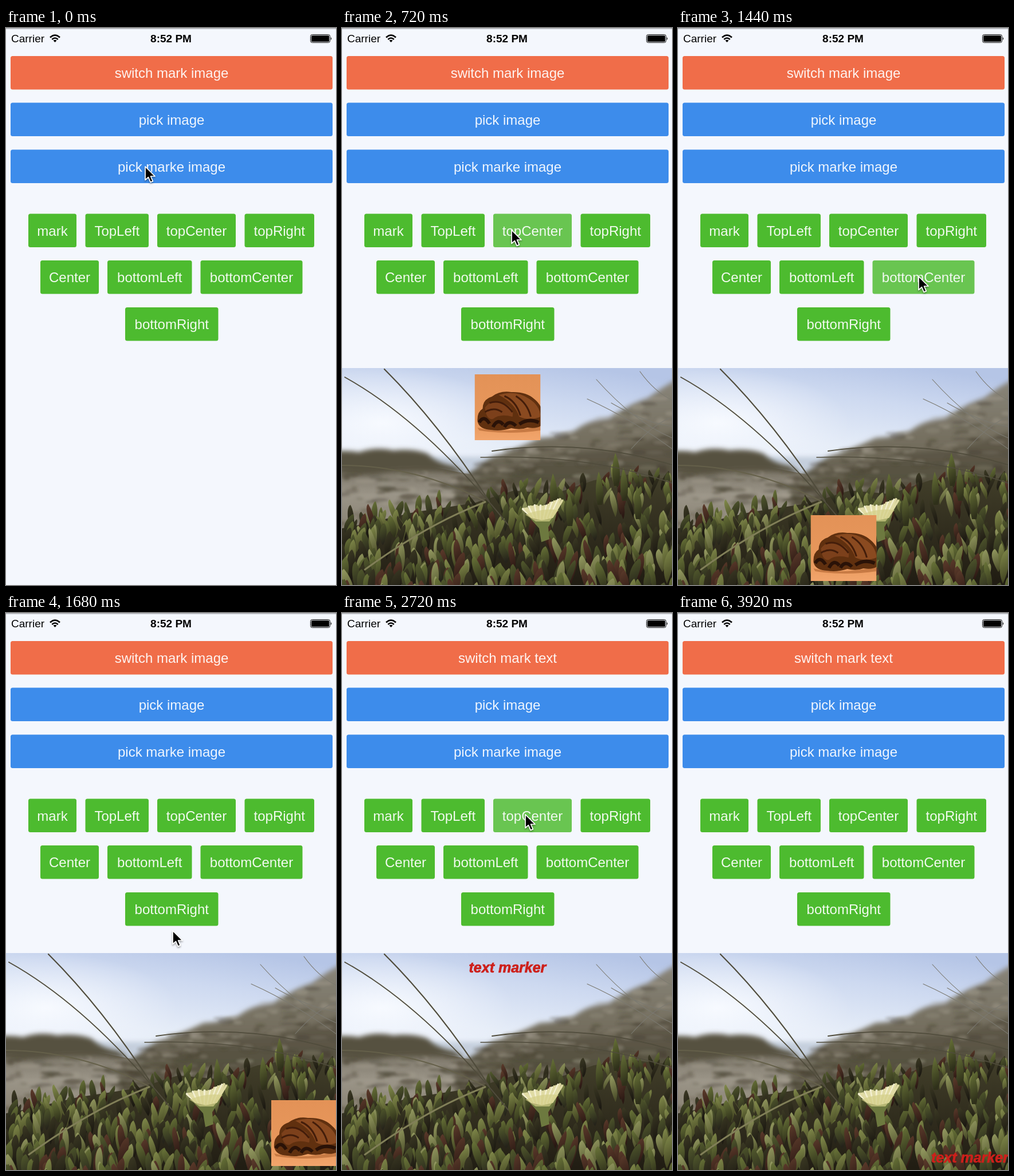
Write an HTML page that moves like this. It is 576 by 973 pixels and loops after 4000 ms.

```html
<!DOCTYPE html>
<html lang="en">
<head>
<meta charset="utf-8">
<title>Image marker demo</title>
<style>
html, body { margin: 0; width: 100%; height: 100%; overflow: hidden; background: #f4f7fd; }
svg { display: block; width: 576px; height: 973px; }
text { font-family: "Liberation Sans", Arial, sans-serif; }
.label { font-size: 24px; fill: #fff; fill-opacity: .92; text-anchor: middle; }
.mark { font-size: 25px; font-weight: bold; font-style: italic; fill: #cd201b; stroke: #cd201b; }
</style>
</head>
<body>
<svg id="stage" viewBox="0 0 576 973" xmlns="http://www.w3.org/2000/svg">
  <defs>
    <linearGradient id="sky" x1=".75" y1="0" x2=".3" y2="1">
      <stop offset="0" stop-color="#b5c5e6"/><stop offset=".3" stop-color="#cdd9f0"/>
      <stop offset=".7" stop-color="#e6edf8"/><stop offset="1" stop-color="#eef3fb"/>
    </linearGradient>
    <radialGradient id="glow">
      <stop offset="0" stop-color="#f7faff"/><stop offset="1" stop-color="#f1f5fd" stop-opacity="0"/>
    </radialGradient>
    <linearGradient id="dune" x1="0" y1="0" x2="0" y2="1">
      <stop offset="0" stop-color="#8b877c"/><stop offset=".45" stop-color="#736d5d"/>
      <stop offset="1" stop-color="#4b4636"/>
    </linearGradient>
    <linearGradient id="sand" x1="0" y1="0" x2="0" y2="1">
      <stop offset="0" stop-color="#777164"/><stop offset=".4" stop-color="#9b9588"/>
      <stop offset="1" stop-color="#827b6c"/>
    </linearGradient>
    <linearGradient id="field" x1="0" y1="0" x2=".1" y2="1">
      <stop offset="0" stop-color="#45422c"/><stop offset="1" stop-color="#211d13"/>
    </linearGradient>
    <linearGradient id="wall" x1="0" y1="0" x2="0" y2="1">
      <stop offset="0" stop-color="#e39257"/><stop offset=".7" stop-color="#e8985c"/>
      <stop offset="1" stop-color="#f2a56c"/>
    </linearGradient>
    <filter id="soft" x="-10%" y="-20%" width="120%" height="140%"><feGaussianBlur stdDeviation="4"/></filter>
    <filter id="fuzz"><feGaussianBlur stdDeviation="2"/></filter>
    <clipPath id="frame"><rect y="594" width="576" height="379"/></clipPath>
    <clipPath id="square"><rect width="115" height="115"/></clipPath>
  </defs>

  <rect width="576" height="973" fill="#f4f7fd"/>
  <rect width="576" height="2" fill="#b9bbc0"/>
  <text x="9" y="25" font-size="19">Carrier</text>
  <text x="288" y="25" font-size="19" font-weight="bold" text-anchor="middle">8:52 PM</text>
  <g fill="none" stroke="#000" stroke-width="2.6">
    <path d="M77 16.5Q85.5 8.5 94 16.5M80.3 20Q85.5 15 90.7 20"/>
    <path d="M82.5 21.8L85.5 25L88.5 21.8Q85.5 19.5 82.5 21.8Z" fill="#000" stroke="none"/>
  </g>
  <rect x="531.5" y="11.5" width="34" height="14" rx="3" fill="none" stroke="#000"/>
  <rect x="533" y="13" width="31" height="11" rx="1.5"/>
  <path d="M567 16Q569.5 18.5 567 21Z"/>

  <g id="buttons"></g>

  <g id="photo" clip-path="url(#frame)">
    <rect y="594" width="576" height="190" fill="url(#sky)"/>
    <ellipse cx="70" cy="690" rx="230" ry="95" fill="url(#glow)"/>
    <path d="M140 749H300V790H140Z" fill="#c5cfdd" filter="url(#soft)"/>
    <path d="M-20 772L150 765L235 782L320 775V890H-20Z" fill="url(#sand)"/>
    <g filter="url(#soft)">
      <path d="M-20 742Q0 736 30 741Q60 731 90 738Q125 734 150 744Q165 760 195 765L215 778Q120 770 70 778T-20 772Z" fill="#57513f"/>
      <path d="M195 800Q230 770 262 749Q300 738 345 716Q375 715 405 704Q430 684 465 682Q505 655 535 646Q560 625 600 606V880H195Z" fill="url(#dune)"/>
      <path d="M290 772Q370 742 440 738T600 696V800H290Z" fill="#4d4838" opacity=".55"/>
    </g>
    <g id="scrub" filter="url(#fuzz)"></g>
    <path id="ground" fill="url(#field)"/>
    <g id="leaves"></g>
    <g id="flower"></g>
    <g fill="none" stroke="#504c3c" stroke-linecap="round">
      <path d="M74 596Q170 692 257 827" stroke-width="2.2"/>
      <path d="M5 610Q145 688 290 868" stroke-width="2"/>
      <path d="M-2 764Q130 764 250 827" stroke="#65604a" stroke-width="2.2"/>
      <path d="M250 828Q150 866 40 946" stroke="#817f58" stroke-width="3"/>
      <path d="M262 739Q420 716 576 763" stroke-width="1.8"/>
      <path d="M242 750Q430 744 576 795" stroke-width="1.5"/>
      <path d="M444 614Q510 688 576 716M428 648Q500 680 576 735M470 655Q530 690 576 696M520 600Q545 635 576 650M505 735Q545 690 576 680" stroke="#7b7970" stroke-width="1.1"/>
    </g>
    <g id="stamp" clip-path="url(#square)">
      <rect width="115" height="115" fill="url(#wall)"/>
      <path d="M5 93Q50 105 115 90V98Q60 106 8 98Z" fill="#b0632f" opacity=".6"/>
      <path d="M5 82Q4 66 14 60Q14 44 30 39Q44 28 64 31Q90 30 104 43Q113 50 118 62V88Q110 96 92 93Q80 98 64 94Q46 100 28 97Q8 96 5 82Z" fill="#60300f"/>
      <path d="M42 36Q72 27 94 42Q114 54 115 74Q96 82 78 74Q70 50 42 36Z" fill="#8a4a20"/>
      <path d="M18 58Q30 42 50 50Q70 58 66 74Q44 68 32 78Q20 80 18 58Z" fill="#7c401b"/>
      <path d="M8 84Q16 70 26 86M32 92Q40 76 50 88M52 92Q60 78 72 90M78 87Q94 76 112 84" fill="none" stroke="#2a1207" stroke-width="6"/>
      <path d="M26 50Q48 42 66 66M52 38Q72 46 80 72M72 38Q92 50 98 74M18 66Q34 56 48 66" fill="none" stroke="#431d0a" stroke-width="3"/>
    </g>
    <text id="caption" class="mark"></text>
  </g>

  <path id="cursor" d="M0 0V23.5L5.4 18.6L9.2 27.4L13.3 25.6L9.6 17H17Z" fill="#000" stroke="#fff" stroke-width="1.7" stroke-linejoin="round" style="filter:drop-shadow(0 2px 1.5px rgba(0,0,0,.35))"/>
</svg>
<script>
const NS = "http://www.w3.org/2000/svg", LOOP = 4000, STEP = 80;
const $ = id => document.getElementById(id);

function add(parent, tag, attrs, text) {
  const el = document.createElementNS(NS, tag);
  for (const k in attrs) el.setAttribute(k, attrs[k]);
  if (text) el.textContent = text;
  parent.appendChild(el);
  return el;
}

// Buttons
const ORANGE = "#f06d49", BLUE = "#3d8ceb", GREEN = "#4dbb2f";
const buttons = {};
function button(name, x, y, w, fill) {
  const g = add($("buttons"), "g", {});
  add(g, "rect", { x, y, width: w, height: 58.5, rx: 3.5, fill });
  const label = add(g, "text", { x: x + w / 2, y: y + 38, class: "label" }, name);
  buttons[name] = { g, label };
}
button("switch", 8, 49, 562, ORANGE);
button("pick image", 8, 130.5, 562, BLUE);
button("pick marke image", 8, 212.5, 562, BLUE);
button("mark", 39, 324.5, 84, GREEN);
button("TopLeft", 138.5, 324.5, 110.5, GREEN);
button("topCenter", 264, 324.5, 137, GREEN);
button("topRight", 416.5, 324.5, 121.5, GREEN);
button("Center", 60, 406, 102, GREEN);
button("bottomLeft", 177, 406, 147.5, GREEN);
button("bottomCenter", 339.5, 406, 178, GREEN);
button("bottomRight", 208, 488, 162.5, GREEN);

// Seeded plants
let seed = 11;
function rand(a = 0, b = 1) {
  seed = (seed * 16807) % 2147483647;
  return a + (b - a) * seed / 2147483647;
}
const ridge = [[-20, 866], [40, 854], [125, 834], [230, 818], [300, 796], [370, 802], [440, 778], [500, 768], [600, 780]];
function lerpAt(points, v) {
  let i = 1;
  while (i < points.length - 1 && points[i][0] < v) i++;
  const a = points[i - 1], b = points[i];
  const k = Math.max(0, Math.min(1, (v - a[0]) / (b[0] - a[0])));
  const e = k * k * (3 - 2 * k);
  return a.slice(1).map((p, j) => p + (b[j + 1] - p) * e);
}
$("ground").setAttribute("d", "M" + ridge.map(p => [p[0], p[1] + 12]).join("L") + "L600 980L-20 980Z");

// Mottled sand and dune
for (let i = 0; i < 230; i++) {
  const cx = rand(-10, 586), crest = cx < 230 ? 775 : 760 - (cx - 230) * .36;
  add($("scrub"), "ellipse", {
    cx, cy: rand(crest, lerpAt(ridge, cx)[0] + 15), rx: rand(5, 18), ry: rand(2, 5),
    fill: rand() < .55 ? "#464030" : "#a39d8e", opacity: rand(.15, .45)
  });
}

const tones = [["#838c4c", "#434522"], ["#6a7539", "#2f301a"], ["#525a2d", "#25231a"],
               ["#3c3a24", "#1b1811"], ["#5c3b2b", "#2a1813"], ["#969c62", "#4d4f2b"]];
tones.forEach(([top, low], i) => {
  const grad = add(document.querySelector("defs"), "linearGradient", { id: "tone" + i, x1: 0, y1: 0, x2: .2, y2: 1 });
  add(grad, "stop", { offset: 0, "stop-color": top });
  add(grad, "stop", { offset: 1, "stop-color": low });
});

const leaves = [];
for (let i = 0; i < 480; i++) {
  const x = rand(-10, 586), top = lerpAt(ridge, x)[0];
  leaves.push({ x, y: top + 22 + rand() * (1010 - top) });
}
leaves.sort((a, b) => a.y - b.y);
for (const { x, y } of leaves) {
  const near = (y - 790) / 200;
  const h = rand(22, 42) + near * 20, w = rand(4, 8) + near * 4;
  const dx = rand(-15, 15), tip = y - h;
  const tone = Math.floor(rand(0, tones.length - .5));
  add($("leaves"), "path", {
    d: `M${x} ${y}C${x - w} ${y - h * .4} ${x + dx - w} ${tip + 5} ${x + dx} ${tip}` +
       `C${x + dx + w * .6} ${tip + 8} ${x + w} ${y - h * .4} ${x} ${y}Z`,
    fill: `url(#tone${tone})`
  });
}
// Tall shoots on the right
for (const [x, y] of [[477, 742], [491, 768], [448, 775], [368, 778], [515, 800], [396, 812]])
  add($("leaves"), "path", { d: `M${x} ${y}q-9 30 -2 58h8q6 -30 -6 -58Z`, fill: "url(#tone1)" });

// Flower
const flower = $("flower");
add(flower, "path", { d: "M328 856Q350 864 374 850L360 872L362 893L348 898L344 874Z", fill: "#6d793f" });
for (let i = 0; i <= 20; i++) {
  const k = i / 10 - 1, x = 350 + k * 34;
  const y = 833 - k * 8 + rand(-3, 3);
  add(flower, "path", {
    d: `M${349 + k * 18} ${858 - Math.abs(k) * 4}L${x} ${y}`, stroke: i % 3 ? "#e0dba4" : "#f3efd0",
    "stroke-width": 4, "stroke-linecap": "round"
  });
}
add(flower, "path", { d: "M320 850Q350 838 378 842L362 862H338Z", fill: "#d3cf88", opacity: .7 });

// Pressed buttons: [time, name]
const presses = [
  [240, "mark"], [480, "TopLeft"], [640, "topCenter"], [880, "topRight"], [1040, "Center"],
  [1280, "bottomLeft"], [1440, "bottomCenter"], [1520, "bottomRight"], [1920, "switch"],
  [2240, "mark"], [2480, "TopLeft"], [2640, "topCenter"], [2800, "topRight"], [3040, "Center"],
  [3360, "bottomLeft"], [3520, "bottomCenter"], [3680, "bottomRight"]
];
const SWITCH = 1920, HOLD = 160;

// Cursor tip: [time, x, y]
const path = [
  [0, 243, 242], [240, 70, 352], [320, 70, 352], [480, 185, 352], [560, 185, 352], [640, 296, 353],
  [720, 296, 353], [880, 470, 352], [960, 470, 352], [1040, 110, 434], [1120, 110, 434],
  [1200, 246, 434], [1360, 246, 434], [1440, 420, 434], [1520, 285, 518], [1600, 285, 518],
  [1680, 291, 555], [1920, 285, 80], [2000, 285, 80], [2240, 61, 350], [2320, 61, 350],
  [2480, 185, 352], [2560, 185, 352], [2640, 320, 352], [2720, 320, 352], [2800, 470, 352],
  [2880, 470, 352], [3040, 120, 434], [3120, 120, 434], [3200, 153, 438], [3360, 246, 434],
  [3440, 246, 434], [3520, 420, 434], [3600, 420, 434], [3680, 285, 518], [3760, 285, 518], [3920, 300, 985]
];

function place(name, isText) {
  const col = /left/i.test(name) ? 0 : /right/i.test(name) ? 2 : 1;
  const row = /^top/i.test(name) ? 0 : /^bottom/.test(name) ? 2 : 1;
  if (name === "mark") return isText ? [18, 634] : [18, 605];
  return isText ? [[-2, 221.5, 442][col], [628, 795, 960][row]]
                : [[-2, 231.5, 463][col], [605, 728, 851][row]];
}
const show = (el, on) => el.setAttribute("visibility", on ? "inherit" : "hidden");

function draw(t) {
  const [x, y] = lerpAt(path, t);
  $("cursor").setAttribute("transform", `translate(${x} ${y})`);

  for (const name in buttons) {
    const down = presses.some(p => p[1] === name && t >= p[0] && t < p[0] + HOLD);
    buttons[name].g.setAttribute("opacity", down ? .83 : 1);
  }
  buttons.switch.label.textContent = "switch mark " + (t < SWITCH ? "image" : "text");

  const last = presses.filter(p => p[0] <= t && p[1] !== "switch").pop();
  $("photo").setAttribute("visibility", last ? "visible" : "hidden");
  if (!last) return;
  const isText = last[0] > SWITCH, pos = place(last[1], isText);
  show($("stamp"), !isText);
  show($("caption"), isText);
  const el = isText ? $("caption") : $("stamp");
  el.setAttribute("transform", `translate(${pos})`);
  if (isText) {
    const plain = last[1] === "mark";
    el.textContent = plain ? "text mark" : "text marker";
    el.setAttribute("stroke-width", plain ? 0 : .7);
  }
}

function tick(now) {
  draw(Math.floor((now % LOOP) / STEP) * STEP);
  requestAnimationFrame(tick);
}
draw(0);
requestAnimationFrame(tick);
</script>
</body>
</html>
```
